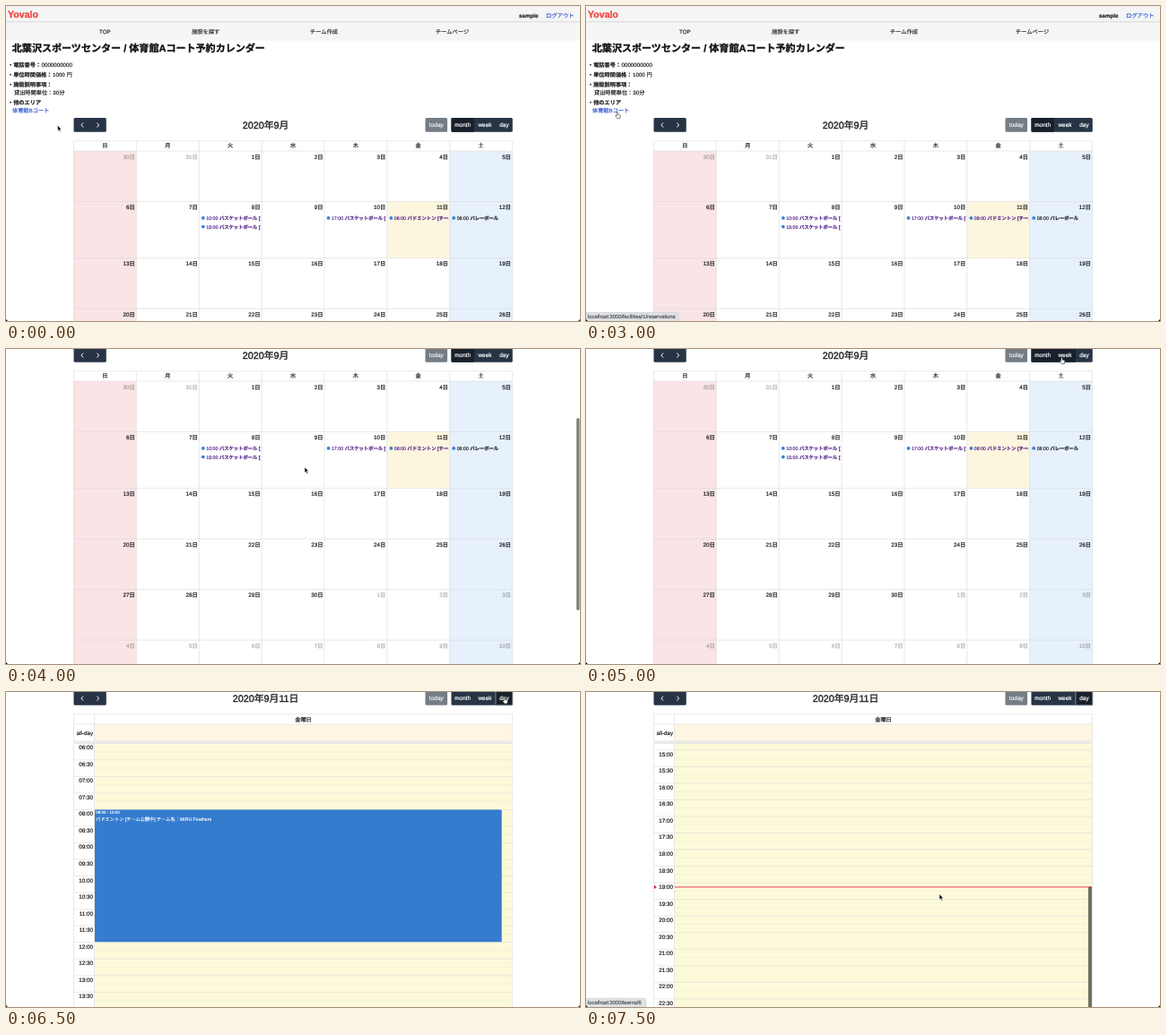
Animation of 640x352 px, one loop 8 s. Source, as an HTML page:

```html
<!DOCTYPE html>
<html lang="ja">
<head>
<meta charset="utf-8">
<title>予約カレンダー</title>
<style>
html, body { margin: 0; width: 100%; height: 100%; overflow: hidden; background: #fff; }
#stage { display: block; width: 100vw; height: 100vh; }
text {
  font-family: "Liberation Sans", "Noto Sans CJK JP", "Noto Sans CJK", sans-serif;
  white-space: pre;
  text-rendering: geometricPrecision;
  stroke-width: .03em;
}
</style>
</head>
<body>
<svg id="stage" viewBox="0 0 640 352" xmlns="http://www.w3.org/2000/svg"></svg>
<script>
const LOOP = 8000, STEP = 500;
const LEFT = 75.5, RIGHT = 564.5, AXIS = 98.5;
const HEAD = 24.8, BODY = 36, SLOTS = 57.4, SLOT = 18.53;
const DAYS = [...'日月火水木金土'];
const INK = '#1c1c1c', LINE = '#dadada', NAVY = '#263446', DARK = '#17202b';
const PINK = '#fae4e5', SKY = '#e6f1fc', TODAY = '#fdf6df', SLOT_TODAY = '#fdfad9', ALLDAY_TODAY = '#fef6e3';
const BLUE = '#357ccf', LINK = '#2f55d4', VISITED = '#4f1c86';

// Each entry changes the state from that moment on.
const cues = [
  [0, { view: 'month', court: 'A', scroll: 0, slotScroll: 0, bar: false, status: '', active: 'month', hover: '', focus: '', hand: false, x: 57.5, y: 133.3 }],
  [1500, { hand: true, x: 35, y: 119 }],
  [2000, { court: 'B', status: 'localhost:3000/facilities/2/reservations' }],
  [2500, { status: '' }],
  [3000, { court: 'A', status: 'localhost:3000/facilities/1/reservations' }],
  [3500, { status: '', scroll: 21, bar: true, hand: false, x: 333, y: 132 }],
  [4000, { scroll: 126 }],
  [4500, { x: 489, y: 33 }],
  [5000, { bar: false, hand: true, hover: 'week', x: 530.5, y: 9.8 }],
  [5500, { view: 'week', active: 'week', focus: 'week' }],
  [6000, { hover: 'day', x: 556, y: 6.3 }],
  [6500, { view: 'day', active: 'day', focus: 'day' }],
  [7000, { hover: '', status: 'localhost:3000/teams/6', x: 394.5, y: 226 }],
  [7500, { hand: false, slotScroll: 326, x: 394, y: 225.8 }]
];

const rect = (x, y, w, h, fill, more = '') =>
  `<rect x="${x}" y="${y}" width="${w}" height="${h}" fill="${fill}" ${more}/>`;
const line = (x1, y1, x2, y2, color = LINE, more = '') =>
  `<path d="M${x1} ${y1}L${x2} ${y2}" stroke="${color}" stroke-width=".6" ${more}/>`;
const text = (x, y, s, size = 6.2, fill = INK, more = '') =>
  `<text x="${x}" y="${y}" font-size="${size}" fill="${fill}" stroke="${fill}" ${more}>${s}</text>`;
const clip = (x, y, w, h, inner) =>
  `<svg x="${x}" y="${y}" width="${w}" height="${h}" viewBox="${x} ${y} ${w} ${h}">${inner}</svg>`;
const range = n => [...Array(n).keys()];
const MID = 'text-anchor="middle"', END = 'text-anchor="end"', BOLD = 'font-weight="700"';

function pageTop(court) {
  const other = court === 'A' ? 'B' : 'A';
  const label = (y, s) => text(2, y, '・' + s, 6.2, INK, BOLD);
  return rect(0, 0, 640, 38.6, '#f5f5f5') + line(0, 17.7, 640, 17.7, '#c8c8c8') +
    text(2, 13.4, 'Yovalo', 10.6, '#f0453f', BOLD) +
    text(572, 12.8, 'sample', 6.2, INK, BOLD) +
    text(602, 12.8, 'ログアウト', 6.3, LINK) +
    [[104, 'TOP'], [207, '施設を探す'], [339, 'チーム作成'], [479, 'チームページ']]
      .map(([x, s]) => text(x, 31, s, 6.25, '#333')).join('') +
    text(6.8, 51.4, `北葉沢スポーツセンター / 体育館${court}コート予約カレンダー`, 11.05, '#111', BOLD) +
    label(68.2, '電話番号：') + text(39.5, 68, '0000000000') +
    label(79, '単位時間価格：') + text(52, 79, '1000 円') +
    label(89.5, '施設説明事項：') + text(9, 98.8, '貸出時間単位：30分') +
    label(110.4, '他のエリア') + text(7, 119.3, `体育館${other}コート`, 6.2, LINK);
}

function toolbar(s, title) {
  const chevron = (x, d) => `<path d="M${x - d} 4.6l${2 * d} 2.5l${-2 * d} 2.5" fill="none" stroke="#fff"/>`;
  const tabs = [['month', 496.5, 522], ['week', 522, 546], ['day', 546, 564.8]];
  const tab = ([name, a, b]) => {
    const dark = name === s.active || name === s.hover;
    const ring = name === s.focus ? 'stroke="#7f8995" stroke-width="1"' : '';
    return (dark ? rect(a, -1, b - a, 15.8, DARK, `rx="1.2" ${ring}`) : '') +
      text((a + b) / 2, 9.4, name, 6.5, '#fff', MID);
  };
  return rect(LEFT, -1, 36.3, 15.8, NAVY, 'rx="1.6"') + chevron(85, -1.1) + chevron(102.5, 1.1) +
    text(289.6, 11.2, title, 10.8, INK, MID) +
    rect(467.5, -1, 24.6, 15.8, '#747c86', 'rx="1.6"') + text(479.8, 9.4, 'today', 6.5, '#f4f4f4', MID) +
    rect(496.5, -1, 68.3, 15.8, NAVY, 'rx="1.6"') + tabs.map(tab).join('');
}

function monthEvent(x, y, time, name, color) {
  return `<circle cx="${x + 4.6}" cy="${y}" r="1.9" fill="#3a80d2"/>` +
    clip(x, y - 5, 68.8, 10, text(x + 8, y + 1.9, `${time} <tspan font-weight="700">${name}</tspan>`, 5.3, color));
}

function month(court) {
  const w = (RIGHT - LEFT) / 7, colX = i => LEFT + w * i;
  const rowY = r => court === 'A' ? BODY + 56.5 * r + (r > 1 ? 6.7 : 0) : BODY + 57.6 * r;
  const bottom = rowY(6), h = bottom - BODY;
  let out = rect(LEFT, BODY, w, h, PINK) + rect(colX(6), BODY, w, h, SKY) +
    rect(colX(5), rowY(1), w, rowY(2) - rowY(1), TODAY) + line(LEFT, HEAD, RIGHT, HEAD);
  out += range(8).map(i => line(colX(i), HEAD, colX(i), bottom)).join('');
  out += range(7).map(r => line(LEFT, rowY(r), RIGHT, rowY(r))).join('');
  out += DAYS.map((d, i) => text(colX(i + .5), 32.4, d, 6.2, INK, MID)).join('');
  out += range(42).map(i => {
    const day = i < 2 ? 30 + i : i < 32 ? i - 1 : i - 31;
    const faded = i < 2 || i > 31 ? 'opacity=".35"' : '';
    return text(colX(i % 7) + 68.4, rowY(Math.floor(i / 7)) + 8.5, day + '日', 6.3, INK, `${END} ${faded}`);
  }).join('');
  if (court === 'A') {
    const ball = 'バスケットボール [チーム公開中]';
    out += monthEvent(colX(2), 110.9, '10:00', ball, VISITED) +
      monthEvent(colX(2), 120.6, '15:00', ball, VISITED) +
      monthEvent(colX(4), 110.9, '17:00', ball, VISITED) +
      monthEvent(colX(5), 110.9, '08:00', 'バドミントン [チーム公開中]', VISITED) +
      monthEvent(colX(6), 110.9, '08:00', 'バレーボール', INK);
  }
  return out;
}

function block(x, colWidth, from, to, lines) {
  const y = SLOTS + (from - 6) * 2 * SLOT, h = (to - from) * 2 * SLOT;
  const hour = n => String(n).padStart(2, '0') + ':00';
  return rect(x + .5, y, colWidth * .975 - .6, h - .4, BLUE, 'rx="1.2"') +
    text(x + 1.8, y + 4.8, `${hour(from)} - ${hour(to)}`, 4.5, '#fff') +
    lines.map((s, i) => text(x + 1.6, y + 12 + i * 7.05, s, 5.2, '#fff')).join('');
}

function timeGrid(view, scroll) {
  const week = view === 'week', n = week ? 7 : 1;
  const w = (RIGHT - AXIS) / n, colX = i => AXIS + w * i;
  const allDay = week ? { 0: PINK, 5: ALLDAY_TODAY, 6: SKY } : { 0: ALLDAY_TODAY };
  const slots = week ? { 0: PINK, 5: SLOT_TODAY, 6: SKY } : { 0: SLOT_TODAY };
  const fill = (colors, y, h) => Object.keys(colors).map(i => rect(colX(+i), y, w, h, colors[i])).join('');
  const heads = week ? DAYS.map((d, i) => `9/${6 + i}(${d})`) : ['金曜日'];

  let grid = range(36).map(i => {
    const y = SLOTS + i * SLOT, half = y + SLOT / 2;
    const label = String(6 + (i >> 1)).padStart(2, '0') + (i % 2 ? ':30' : ':00');
    return line(LEFT, y, RIGHT, y) + line(AXIS, half, RIGHT, half, LINE, 'stroke-dasharray="1 1"') +
      text(97, y + 6.9, label, 6.3, INK, END);
  }).join('');
  if (week) {
    grid += block(colX(2), w, 10, 12, ['バスケットボール [チーム', '公開中] チーム名：MIRU', 'Hoopers']) +
      block(colX(5), w, 8, 12, ['バドミントン [チーム公開', '中] チーム名：MIRU', 'Feathers']) +
      block(colX(6), w, 8, 12, ['バレーボール']);
  } else {
    const now = SLOTS + 26 * SLOT + 4.8;
    grid += block(AXIS, w, 8, 12, ['バドミントン [チーム公開中] チーム名：MIRU Feathers']) +
      line(AXIS, now, RIGHT, now, '#e5405f', 'style="stroke-width:1"') +
      `<path d="M76 ${now - 2.3}l3 2.3l-3 2.3z" fill="#d8264c"/>`;
  }
  const scroller = `<g transform="translate(0 ${-scroll})">${grid}</g>`;
  const thumb = scroll ? rect(560, SLOTS + scroll * .492, 4, 160, '#000', 'rx="1.5" opacity=".55"') : '';

  return fill(allDay, BODY, 19) + fill(slots, SLOTS, 300) +
    clip(LEFT, SLOTS, RIGHT - LEFT + 1, 300, scroller) +
    rect(LEFT, 55, RIGHT - LEFT, 2.4, '#eee') +
    [HEAD, BODY, 55, SLOTS].map(y => line(LEFT, y, RIGHT, y)).join('') +
    [LEFT, ...range(n + 1).map(colX)].map(x => line(x, HEAD, x, 55) + line(x, SLOTS, x, 360)).join('') +
    heads.map((s, i) => text(colX(i + .5), 32.6, s, 6.2, INK, MID)).join('') +
    text(97, 48, 'all-day', 6.2, INK, END) + thumb;
}

function pointer({ hand, x, y }) {
  const shape = hand
    ? '<path d="M-.8 .2Q0-.7.7.2V2.3l2 .5q.9.3.7 1.2L2.8 6.7H-.3L-2.2 4q-.1-1 .8-.6l.6.5z" fill="#fff" stroke="#222" stroke-width=".55"/>'
    : '<path d="M0 0V6.2L1.4 5L2.5 7.4L3.5 6.9L2.5 4.6H4.4z" fill="#000" stroke="#fff" stroke-width=".5"/>';
  return `<g transform="translate(${x} ${y})">${shape}</g>`;
}

function statusBar(s) {
  if (!s) return '';
  const w = s.includes('teams') ? 67 : 103.5;
  return rect(-2, 342.3, w + 2, 12, '#dfe1e3', 'rx="1.5" stroke="#c9cbcd" stroke-width=".5"') +
    text(2, 349.4, s, 5.8, '#4c4f52');
}

function draw(s) {
  const title = { month: '2020年9月', week: '2020年9月6日 – 12日', day: '2020年9月11日' }[s.view];
  const body = s.view === 'month' ? month(s.court) : timeGrid(s.view, s.slotScroll);
  return rect(0, 0, 640, 352, '#fff') +
    `<g transform="translate(0 ${-s.scroll})">${pageTop(s.court)}` +
    `<g transform="translate(0 126)">${body}${toolbar(s, title)}</g></g>` +
    (s.bar ? rect(636, s.scroll * .611, 3.6, 215, '#858585', 'rx="1.8"') : '') +
    statusBar(s.status) +
    '<path d="M0 350v2h2zM640 350v2h-2z" fill="#111"/>' + pointer(s);
}

const stage = document.getElementById('stage');
const start = performance.now();
let shown = -1;

function tick() {
  const t = (performance.now() - start) % LOOP;
  const step = Math.floor(t / STEP);
  if (step !== shown) {
    shown = step;
    const past = cues.filter(([at]) => at <= step * STEP).map(([, change]) => change);
    stage.innerHTML = draw(Object.assign({}, ...past));
  }
  requestAnimationFrame(tick);
}
tick();
</script>
</body>
</html>
```
